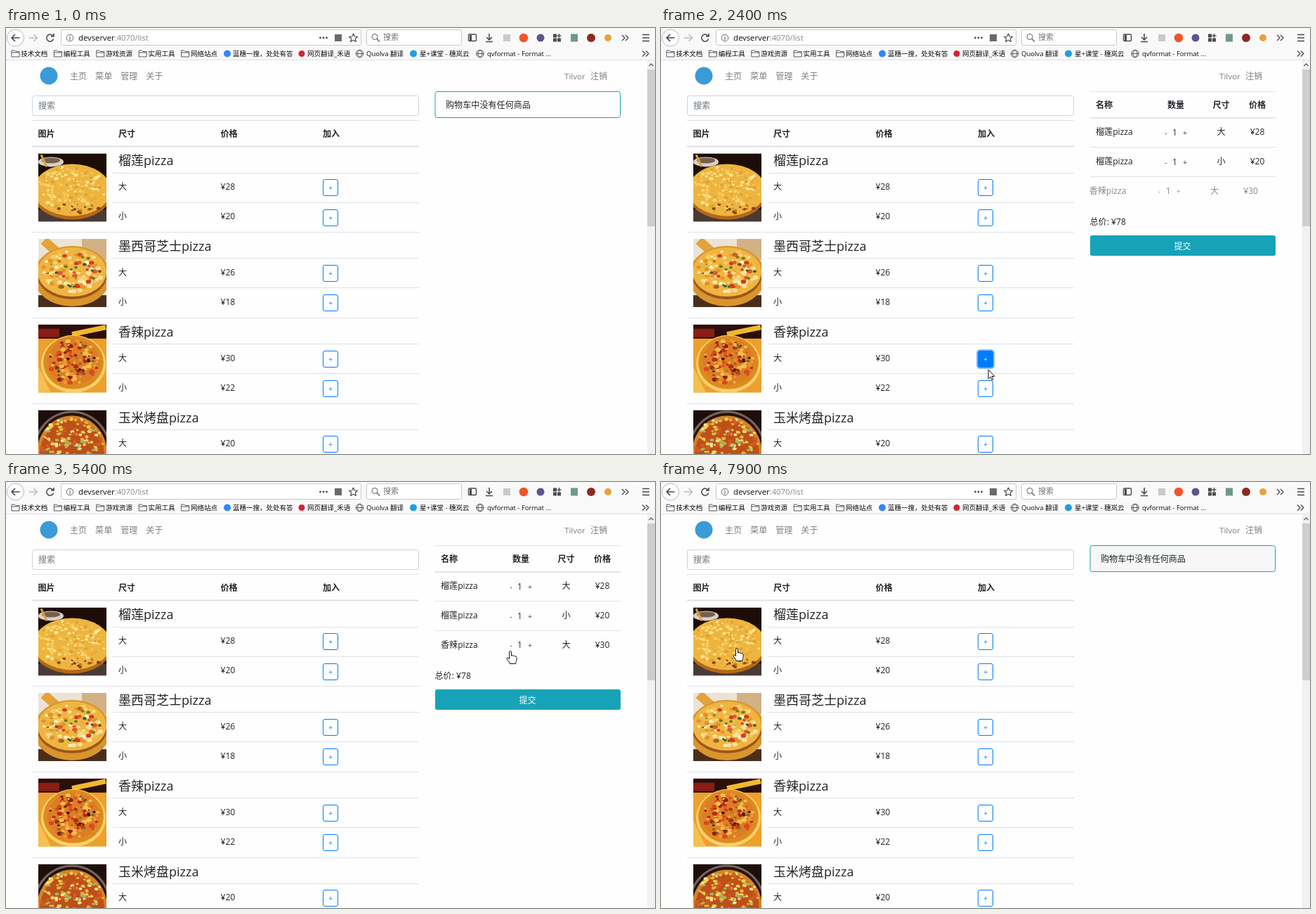
Recreate the animation shown at these times as an HTML page. Size 924 px wide and 606 px high, loop 8 s.

```html
<!DOCTYPE html>
<html lang="zh-CN">
<head>
<meta charset="utf-8">
<title>Menu</title>
<style>
html, body { margin: 0; width: 100%; height: 100%; overflow: hidden; background: #fefefe; }
svg { display: block; }
#stage { width: 100%; height: 100%; }
text { font-family: "Open Sans", "Noto Sans CJK SC", "Noto Sans CJK", sans-serif; white-space: pre; }
</style>
</head>
<body>
<svg id="stage" viewBox="0 0 924 606">
  <g id="page"></g>
  <g id="live"></g>
</svg>
<script>
const LOOP = 8000, STEP = 100, FADE = 300;
const INK = '#212529', RULE = '#dee2e6', BLUE = '#007bff', TEAL = '#17a2b8', ICON = '#4a4a4f';
const PITCH = 121.7, ROW = 41.6;

// Drawing helpers
const text = (x, cy, s, { size = 12.1, fill = INK, bold, mid } = {}) =>
  `<text x="${x}" y="${cy + size * 0.36}" font-size="${size}" fill="${fill}"` +
  `${bold ? ' font-weight="700"' : ''}${mid ? ' text-anchor="middle"' : ''}>${s}</text>`;
const rect = (x, y, w, h, fill, stroke = 'none', r = 0, extra = '') =>
  `<rect x="${x}" y="${y}" width="${w}" height="${h}" rx="${r}" fill="${fill}" stroke="${stroke}" ${extra}/>`;
const disc = (x, y, r, fill, stroke = 'none') =>
  `<circle cx="${x}" cy="${y}" r="${r}" fill="${fill}" stroke="${stroke}"/>`;
const oval = (x, y, rx, ry, fill) =>
  `<ellipse cx="${x}" cy="${y}" rx="${rx}" ry="${ry}" fill="${fill}"/>`;
const path = (d, stroke = ICON, w = 1.4, fill = 'none') =>
  `<path d="${d}" fill="${fill}" stroke="${stroke}" stroke-width="${w}" stroke-linejoin="round"/>`;
const hline = (x, y, w, h = 1) => rect(x, y, w, h, RULE);

function random(seed) {
  return () => (seed = (seed * 16807) % 2147483647) / 2147483647;
}

// Loose dots inside an ellipse
function scatter(seed, count, [x, y, rx, ry], colors, min, max) {
  const rnd = random(seed);
  let out = '';
  for (let i = 0; i < count; i++) {
    const a = rnd() * Math.PI * 2, d = Math.sqrt(rnd()), s = min + rnd() * (max - min);
    out += oval((x + Math.cos(a) * d * rx).toFixed(1), (y + Math.sin(a) * d * ry).toFixed(1),
      s.toFixed(1), (s * 0.75).toFixed(1), colors[Math.floor(rnd() * colors.length)]);
  }
  return out;
}

const photos = [
  rect(0, 0, 97, 97, '#1c0d08') + oval(18, 12, 18, 7, '#d8d0c6') + oval(18, 10, 13, 4, '#75604e') +
    path('M4 2L12 19', '#dba23c', 3) + rect(0, 80, 97, 17, '#4a3a34') +
    oval(48, 55, 57, 39, '#b5681a') + oval(48, 52, 55, 37, '#edb53f') +
    scatter(71, 170, [48, 50, 50, 32], ['#fbd873', '#f4c552', '#ffe794', '#e0a034'], 1, 3) +
    scatter(19, 20, [48, 79, 40, 8], ['#8a4312', '#c47a1e'], 1, 3),
  rect(0, 0, 97, 97, '#ece3d4') + rect(62, 0, 35, 30, '#d2b184') + rect(0, 80, 97, 17, '#4a2e1c') +
    path('M8 2L30 22', '#e2a23c', 13) + oval(48, 53, 55, 43, '#d9942c') +
    oval(48, 50, 50, 36, '#9c561a') + oval(48, 47, 49, 35, '#efb540') +
    scatter(33, 100, [48, 46, 43, 29], ['#fce09a', '#f8cc62', '#e2922a', '#fff0c4'], 1.5, 4) +
    scatter(58, 18, [50, 46, 38, 25], ['#d23c1a', '#e2582c'], 2.2, 4.2) +
    scatter(91, 20, [50, 46, 38, 26], ['#617c28', '#3d5a1e'], 1, 2.8),
  rect(0, 0, 97, 97, '#eda02c') + rect(0, 0, 97, 20, '#2a0f0c') + rect(0, 6, 30, 12, '#8a1d14') +
    path('M48 14L96 4', '#f0b92c', 7) + path('M0 97V60L18 97z', '#f6c860', 0, '#f6c050') +
    oval(50, 56, 46, 41, '#fbd068') + oval(50, 54, 43, 38, '#dd8a20') + oval(50, 53, 37, 33, '#dc7e26') +
    scatter(45, 120, [50, 53, 35, 31], ['#b82c12', '#8a1f0e', '#dc4a1c', '#f7c04e', '#f09a30'], 1.5, 4) +
    scatter(12, 24, [50, 53, 34, 28], ['#45160c', '#667024'], 1, 2.6),
  rect(0, 0, 97, 97, '#1c0e0a') + oval(48, 60, 56, 59, '#75655a') + oval(48, 61, 53, 57, '#26120c') +
    oval(48, 62, 50, 54, '#d58228') + oval(48, 64, 46, 50, '#bf4f18') +
    scatter(27, 190, [48, 52, 44, 43], ['#efd25c', '#dfb83e', '#a2b46a', '#f7e692', '#cf5e22'], 1.8, 3.2)
];

const items = [
  ['榴莲pizza', 28, 20], ['墨西哥芝士pizza', 26, 18], ['香辣pizza', 30, 22], ['玉米烤盘pizza', 20, 15]
];

function globe(x) {
  return disc(x, 36.5, 5.2, 'none', ICON) +
    path(`M${x - 5} 36.5h10M${x} 31.3c-4 3-4 7.400 0 10.400c4-3 4-7.400 0-10.400`, ICON, 0.9);
}
const chevrons = (x, y) => path(`M${x - 5} ${y - 4}l4 4l-4 4M${x} ${y - 4}l4 4l-4 4`);

function drawBrowser() {
  const mark = { size: 9.5, fill: '#0c0c0d' };
  let s = rect(0, 0, 924, 45, '#f9f9fa') + rect(0, 45, 924, 1, '#e1e1e2');
  s += disc(13.5, 14, 12, '#fdfdfd', '#b9b9bb') + path('M19.500 14H8M13 9l-5 5l5 5', ICON, 1.7);
  s += path('M33 14h11M39.500 9l5 5l-5 5', '#bdbdbf', 1.5);
  s += path('M67 11.500a5 5 0 1 0 .6 4M68 8v4h-4', ICON, 1.6);
  s += rect(78.5, 2.5, 427, 22, '#fff', '#c8c8ca', 2) + rect(513.5, 2.5, 135, 22, '#fff', '#c8c8ca', 2);
  s += disc(91, 14, 4.8, 'none', '#6a6a6e') + rect(90.4, 13, 1.2, 4, '#6a6a6e') + rect(90.4, 11, 1.2, 1.2, '#6a6a6e');
  s += text(103, 13.5, 'devserver<tspan fill="#87878a">:4070/list</tspan>', { size: 11.3, fill: '#0c0c0d' });
  for (const x of [447.5, 452, 456.5]) s += disc(x, 14, 1.4, ICON);
  s += rect(468, 9, 10, 10, '#6a6a6e');
  s += path('M494.500 8l1.800 4 4.200.4-3.200 2.900 1 4.200-3.800-2.200-3.800 2.200 1-4.200-3.200-2.900 4.200-.4z', ICON, 1.2);
  s += disc(525, 12.5, 4, 'none', '#5f5f63') + path('M528 15.500l4 4', '#5f5f63', 1.5);
  s += text(537, 13.5, '搜索', { size: 11, fill: '#737376' });
  s += rect(658.5, 9, 11, 9.5, 'none', ICON, 1.5, 'stroke-width="1.4"') + rect(660, 10, 3, 8, ICON);
  s += path('M688 8v8.500M684 13l4 4l4-4M683 19.500h10', ICON, 1.6);
  s += rect(708, 9, 10, 10, '#c9c9cb') + disc(737, 14, 6.3, '#f0542d') + disc(761, 14, 5.5, '#64518f');
  s += rect(779, 8.5, 5, 5, ICON) + rect(779, 14.5, 5, 5, ICON) + rect(785, 14.5, 5, 5, ICON) +
    path('M787.500 8v6M784.500 11h6');
  s += rect(804, 8.5, 10, 11, '#6f9a88') + disc(833, 14, 6, '#8c2a20') + disc(857, 14, 5, '#e8a13c');
  s += chevrons(882, 14) + path('M906 9.500h10M906 14h10M906 18.500h10', ICON, 1.5) + chevrons(911, 36.5);

  ['技术文档', '编程工具', '游戏资源', '实用工具', '网络站点'].forEach((name, i) => {
    const x = 8 + i * 60.4;
    s += path(`M${x} 41V32h4l1.500 1.500h5.500V41zM${x} 35h11`, '#5a5a5e', 1) + text(x + 13.3, 36.5, name, mark);
  });
  s += disc(315, 36.5, 5, '#3385ff') + text(323, 36.5, '蓝穗一搜，处处有答', mark);
  s += disc(421, 36.5, 4.5, '#dc1e32') + text(429, 36.5, '网页翻译_禾语', mark);
  s += globe(503.5) + text(513, 36.5, 'Quolva 翻译', mark);
  s += disc(580, 36.5, 5, '#1e9fe0') + text(589, 36.5, '星+课堂 - 穗岚云', mark);
  s += globe(675) + text(685, 36.5, 'qvformat - Format ...', mark);
  s += rect(913, 46, 11, 560, '#f1f1f1') + rect(913, 59, 11, 223, '#cdcdcd') +
    path('M915.500 54l3-3l3 3', '#606060', 1.4);
  return s;
}

function drawMenu() {
  const nav = { fill: '#808080' };
  let s = disc(61, 68, 12.5, '#3a9bd8');
  ['主页', '菜单', '管理', '关于'].forEach((name, i) => s += text(91 + i * 36.1, 69, name, nav));
  s += text(795, 69, 'Tilvor', { ...nav, size: 11.6 }) + text(832, 69, '注销', nav);
  s += rect(37.5, 96.5, 550, 28, '#fff', '#ced4da', 3) + text(46, 111, '搜索', { fill: '#6c757d' });
  s += hline(37, 131, 551) + hline(37, 167.5, 551, 2);
  [['图片', 45.5], ['尺寸', 160], ['价格', 305.5], ['加入', 451]].forEach(([name, x]) =>
    s += text(x, 150.5, name, { bold: true }));
  items.forEach(([name, big, small], i) => {
    const y = i * PITCH;
    s += `<svg x="46" y="${178.4 + y}" width="97" height="97">${photos[i]}</svg>`;
    if (i) s += hline(37, Math.round(168.6 + y), 551);
    s += text(160, 189 + y, name, { size: 18 }) + hline(152, Math.round(205.5 + y), 436) +
      hline(152, Math.round(247.6 + y), 436);
    s += text(160, 226 + y, '大') + text(305.5, 226 + y, '¥' + big) +
      text(160, 268 + y, '小') + text(305.5, 268 + y, '¥' + small);
  });
  return s;
}

// [menu button, hover from, hover to, focus from, focus to]
const presses = [
  [0, 800, 1410, 890, 1690], [1, 1410, 2050, 1690, 2305],
  [4, 2190, 2430, 2305, 2690], [5, 2510, 2850, 2690, 3700]
];

function drawButtons(t) {
  let s = '';
  for (let i = 0; i < 7; i++) {
    const y = Math.floor(215.7 + (i >> 1) * PITCH + (i % 2) * 42.3) + 0.5;
    const p = presses.find(q => q[0] === i) || [];
    const on = t >= p[1] && t < p[2];
    if (t >= p[3] && t < p[4]) s += rect(450.2, y - 1.2, 23.6, 25.4, 'none', '#80bdff', 4, 'stroke-width="2.400"');
    s += rect(451.5, y, 21, 23, on ? BLUE : '#fefefe', BLUE, 2.5) +
      text(462, y + 11.9, '+', { size: 10, fill: on ? '#fff' : BLUE, mid: true });
  }
  return s;
}

// [name, size, price, added at, removed at]
const orders = [
  ['榴莲pizza', '大', 28, 890, 6950], ['榴莲pizza', '小', 20, 1690, 6110],
  ['香辣pizza', '大', 30, 2305, 5590], ['香辣pizza', '小', 22, 2690, 5100]
];
const clicks = [[3700, 1], [4000, 1], [4400, -1], [4700, -1]];
const quantity = (i, t) =>
  i < 3 ? 1 : clicks.reduce((n, [at, d]) => t >= at ? n + d : n, 1);
const easeOut = p => 1 - (1 - Math.min(1, Math.max(0, p))) ** 2;

function drawCart(t) {
  const shown = orders.map((o, i) => [...o, quantity(i, t)]).filter(o => t >= o[3] && t < o[4] + FADE);
  if (!shown.length) {
    return rect(611, 90.5, 263.5, 37, t > 5000 ? '#f7f7f7' : '#fefefe', TEAL, 3) +
      text(626, 110, '购物车中没有任何商品');
  }
  const mid = { mid: true }, sign = { mid: true, size: 10.5, fill: '#24476b' };
  let total = 0;
  let s = hline(610.5, 90, 264.5) + hline(610.5, 127, 264.5, 1.6) + text(619, 110, '名称', { bold: true });
  [['数量', 733], ['尺寸', 797.5], ['价格', 849]].forEach(([name, x]) =>
    s += text(x, 110, name, { bold: true, mid: true }));
  shown.forEach(([name, size, price, added, removed, n], i) => {
    const y = 148 + i * ROW;
    const seen = t < removed ? easeOut((t - added) / FADE) : 1 - easeOut((t - removed) / FADE);
    if (t < removed) total += price * n;
    if (i) s += hline(610.5, Math.round(y - 20.4), 264.5);
    s += `<g opacity="${seen}" transform="translate(${-20 * (1 - seen)} 0)">` +
      text(619, y, name) + text(719, y + 1.5, '-', sign) + text(731.5, y + 0.7, n, mid) +
      text(746, y + 1.5, '+', sign) + text(797.5, y, size, mid) + text(849, y, '¥' + price * n, mid) + '</g>';
  });
  const y = (shown.length - 1) * ROW;
  return s + text(610.5, 192.2 + y, '总价: ¥' + total) +
    rect(611, Math.round(212.2 + y), 264, 29, TEAL, 'none', 3) +
    text(742.5, 227.5 + y, '提交', { fill: '#fff', mid: true });
}

// Pointer tip: [time, x, y, hand]
const track = [
  [100, 872, 492, 0], [800, 463, 230, 1], [1400, 464, 231, 1], [1500, 468, 274, 1], [1900, 468, 274, 0],
  [2200, 463, 465, 1], [2300, 463, 465, 1], [2400, 466, 486, 0], [2600, 465, 508, 1], [2800, 465, 508, 0],
  [3200, 753, 278, 0], [3300, 753, 278, 0], [3500, 745, 274, 1], [3900, 745, 274, 1], [4100, 733, 248, 0],
  [4200, 717, 264, 1], [5200, 717, 264, 1], [5400, 718, 241, 1], [5500, 718, 233, 1], [5700, 718, 233, 0],
  [6000, 718, 191, 1], [6200, 718, 191, 0], [6400, 715, 173, 0], [6700, 717, 142, 1], [7100, 717, 142, 0],
  [7800, 208, 265, 0], [7900, 108, 237, 1]
];
const HAND = 'M-1.500 10.500V1.200a1.500 1.500 0 0 1 3 0V6.300c.3-1 2.600-.9 2.800.4 .5-.9 2.400-.6 2.600.6 ' +
  '.5-.7 2.100-.4 2.100 1V12c0 2-1.200 3-1.500 5.500H-.8C-1 15.500-3.200 13.500-5 10.700c-.8-1.300.8-2.400 2-1.200z';
const ARROW = 'M0 0V13l3-2.800 2 4.600 2-.9-2-4.400H9z';

function drawPointer(t) {
  if (t < track[0][0]) return '';
  const i = track.findLastIndex(k => k[0] <= t);
  const a = track[i], b = track[i + 1] || a;
  const p = b === a ? 0 : (t - a[0]) / (b[0] - a[0]);
  const x = Math.round(a[1] + (b[1] - a[1]) * p), y = Math.round(a[2] + (b[2] - a[2]) * p);
  return `<g transform="translate(${x} ${y})">${path(a[3] ? HAND : ARROW, '#111', 1, '#fff')}</g>`;
}

const live = document.getElementById('live');
document.getElementById('page').innerHTML = drawBrowser() + drawMenu();

let last = -1;
const start = performance.now();
function render() {
  const t = Math.floor(((performance.now() - start) % LOOP) / STEP) * STEP;
  if (t !== last) {
    live.innerHTML = drawButtons(t) + drawCart(t) + drawPointer(t);
    last = t;
  }
  requestAnimationFrame(render);
}
render();
</script>
</body>
</html>
```
